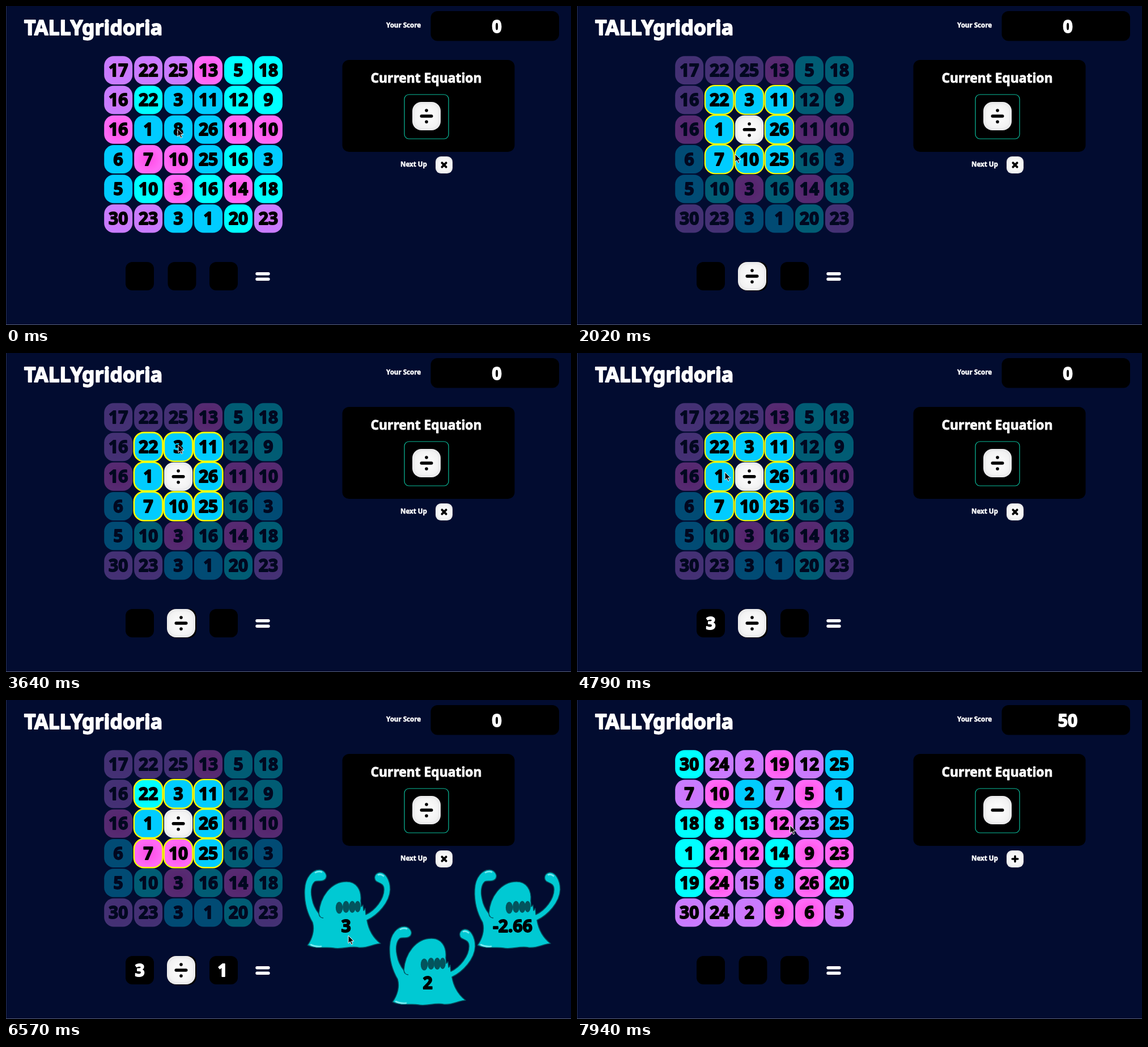
Write an HTML page that moves like this. It is 997 px wide and 562 px high and loops after 8 s.

```html
<!DOCTYPE html>
<html lang="en">
<head>
<meta charset="utf-8">
<title>TALLYgridoria</title>
<style>
html, body { margin: 0; width: 100%; height: 100%; overflow: hidden; background: #020c30; }
svg { display: block; width: 997px; height: 562px; }
text { font: 700 30px "Noto Sans", "Open Sans", sans-serif; text-anchor: middle; stroke-width: 1.8; stroke-linejoin: round; }
.dark { fill: #000; stroke: #000; }
.light { fill: #fff; stroke: #fff; }
.left { text-anchor: start; }
.small { font-size: 11.6px; stroke-width: .5; }
.op { stroke: #000; stroke-width: 5.6; stroke-linecap: round; fill: none; }
.ring { fill: none; stroke: #fdff00; }
</style>
</head>
<body>
<svg viewBox="0 0 997 562" xmlns="http://www.w3.org/2000/svg">
  <defs>
    <radialGradient id="k"><stop offset=".15" stop-color="#ff50e6"/><stop offset=".9" stop-color="#ff69f6"/></radialGradient>
    <radialGradient id="p"><stop offset=".15" stop-color="#d073fb"/><stop offset=".9" stop-color="#c97cff"/></radialGradient>
    <radialGradient id="w"><stop offset=".4" stop-color="#fbfbfb"/><stop offset="1" stop-color="#f3f3f3"/></radialGradient>
    <g id="face">
      <rect x="-25" y="-25" width="50" height="50" rx="16" fill="#ebebec"/>
      <rect x="-21" y="-21" width="42" height="42" rx="14" fill="url(#w)"/>
    </g>
    <g id="divide"><use href="#face"/><path class="op" d="M-8.7 0H8.7M0-10v.01M0 10v.01"/></g>
    <g id="minus"><use href="#face"/><path class="op" d="M-8.7 0H8.7"/></g>
    <g id="times"><use href="#face"/><path class="op" style="stroke-width:6.5" d="M-6-6L6 6M6-6L-6 6"/></g>
    <g id="plus"><use href="#face"/><path class="op" style="stroke-width:6" d="M-8 0H8M0-8V8"/></g>
    <g id="monster">
      <path fill="#00c9d3" stroke="#064a58" stroke-width="1.5" stroke-linejoin="round" d="M532 432C540 421 545 406 541 392C531 375 526 354 527 334C528 312 541 298 554 299C563 300 568 309 564 315C559 322 550 317 545 320C539 325 537 337 540 350C542 361 547 370 552 376C554 347 573 320 601 320C618 320 628 334 626 354L627 364L630 361L631 371L634 367L635 378C651 371 667 351 667 334C667 324 660 323 654 320C648 315 650 306 658 304C670 302 678 318 678 334C677 357 656 379 637 388C640 405 648 419 661 429C647 430 637 438 622 436C606 433 592 440 578 437C564 434 548 440 532 432Z"/>
      <path fill="none" stroke="#064a58" stroke-width="1.5" d="M552 376Q553 384 560 384"/>
      <g fill="#03545d">
        <ellipse cx="588" cy="366" rx="6.2" ry="10.5"/><ellipse cx="600" cy="364.5" rx="6" ry="10.5"/>
        <ellipse cx="611" cy="364.5" rx="5.8" ry="10.5"/><ellipse cx="620.5" cy="364" rx="5.3" ry="10"/>
      </g>
      <path fill="none" stroke="#7beaf0" stroke-width="2.6" stroke-linecap="round" d="M538 431Q545 435 556 434M546 304Q551 301 557 303M657 308Q661 306 666 310"/>
    </g>
  </defs>

  <rect width="997" height="562" fill="#020c30"/>
  <path fill="#283152" d="M0 0h1v562H0z"/>
  <path fill="#596079" d="M0 561h997v1H0z"/>

  <text class="light left" x="32" y="50.5" style="font-size:35.5px">TALLYgridoria</text>
  <text class="light left small" x="671" y="38">Your Score</text>
  <rect x="749.5" y="9" width="226.5" height="52.5" rx="12"/>
  <text id="score" class="light" x="866" y="46.5"></text>

  <rect x="593.5" y="95" width="304" height="162" rx="12"/>
  <text class="light" x="741.5" y="134.7" style="font-size:22.8px;stroke-width:.9">Current Equation</text>
  <rect x="703" y="156" width="78" height="78" rx="8" fill="none" stroke="#0bbd9c" stroke-width="1.2"/>
  <use id="current" x="742" y="194"/>
  <text class="light left small" x="696" y="283">Next Up</text>
  <use id="next" transform="translate(773 280) scale(.6)"/>

  <g id="slots"></g>
  <text id="first" class="light" x="236" y="486.5">3</text>
  <text id="second" class="light" x="382" y="486.5">1</text>
  <g id="chosen"><rect x="287" y="453" width="49" height="49" rx="14"/><use href="#divide" x="309" y="476"/></g>
  <path stroke="#fff" stroke-width="5.4" stroke-linecap="round" d="M443 471.7h20M443 481.2h20"/>

  <g id="before"></g>
  <g id="after"></g>

  <g id="answers">
    <use href="#monster"/><use href="#monster" x="300"/><use href="#monster" x="150" y="100"/>
    <text class="dark" x="600" y="409">3</text>
    <text class="dark" x="894" y="409">-2.66</text>
    <text class="dark" x="744" y="509">2</text>
  </g>
  <path id="cursor" fill="#000" stroke="#fff" stroke-width="1" stroke-linejoin="round" d="M0 0V13.5L3.2 10.7L5.5 15.8L7.8 14.8L5.5 9.9H9.8Z"/>
</svg>

<script>
const LOOP = 8000, PICK = 390, FIRST = 4080, SECOND = 5150, SOLVED = 6900, PULSE = 1500;
const $ = id => document.getElementById(id);
const fills = { p: 'url(#p)', k: 'url(#k)', c: '#00ffff', b: '#00ccff' };

function add(parent, tag, attrs, text) {
  const el = document.createElementNS('http://www.w3.org/2000/svg', tag);
  for (const key in attrs) el.setAttribute(key, attrs[key]);
  if (text) el.textContent = text;
  return parent.appendChild(el);
}

function makeGrid(parent, cells) {
  return cells.split(' ').map((cell, i) => {
    const col = i % 6, row = Math.floor(i / 6);
    const g = add(parent, 'g', { transform: `translate(${198.2 + col * 52.95} ${113.2 + row * 52.25})` });
    const fill = fills[cell.slice(-1)];
    const rect = add(g, 'rect', { x: -25, y: -25, width: 50, height: 50, rx: 17, fill });
    add(g, 'text', { class: 'dark', y: 10.7 }, cell.slice(0, -1));
    const reach = Math.max(Math.abs(col - 2), Math.abs(row - 2));
    return { g, rect, fill, reach };
  });
}

const board = makeGrid($('before'),
  '17p 22p 25p 13k 5c 18c 16p 22c 3b 11b 12c 9c 16k 1b 8b 26b 11k 10k ' +
  '6b 7k 10k 25b 16c 3b 5b 10c 3k 16c 14k 18c 30p 23p 3b 1b 20c 23p');
makeGrid($('after'),
  '30c 24p 2p 19k 12p 25b 7p 10k 2b 7p 5k 1b 18c 8c 13c 12k 23p 25b ' +
  '1c 21k 12k 14c 9k 23k 19c 24k 15p 8b 26k 20c 30p 24p 2p 9k 6k 5p');

const near = board.filter(c => c.reach === 1);
const far = board.filter(c => c.reach > 1);
const rings = near.map(c => add(c.g, 'rect', { class: 'ring', x: -25.3, y: -25.3, width: 50.6, height: 50.6, rx: 17.5 }));
const center = add(board.find(c => c.reach === 0).g, 'use', { href: '#divide' });
for (const x of [211, 285.5, 359]) add($('slots'), 'rect', { x, y: 451, width: 50, height: 50, rx: 12 });

// time, x, y
const path = [
  [0, 303, 216.5], [1350, 303, 216.5], [2020, 279, 261], [2500, 268, 262], [2950, 292, 232],
  [3600, 304, 162], [4250, 304, 162], [4790, 261, 210], [5000, 253, 215], [5250, 253, 215],
  [6050, 745, 467], [6480, 604, 415], [7190, 604, 415], [7490, 454, 255], [7690, 454, 255],
  [7940, 376, 221], [LOOP, 376, 221]
];

function cursorAt(t) {
  const i = path.findIndex(p => p[0] > t);
  const [t0, x0, y0] = path[i - 1], [t1, x1, y1] = path[i];
  const u = (t - t0) / (t1 - t0), e = u * u * (3 - 2 * u);
  return [x0 + (x1 - x0) * e, y0 + (y1 - y0) * e];
}

const show = (el, on) => el.setAttribute('visibility', on ? 'visible' : 'hidden');

function draw(t) {
  const solved = t >= SOLVED, active = t >= PICK && !solved, ready = t >= SECOND && !solved;
  $('before').style.display = solved ? 'none' : '';
  $('after').style.display = solved ? '' : 'none';
  show($('chosen'), active);
  show($('first'), t >= FIRST && !solved);
  show($('second'), ready);
  show($('answers'), ready);
  show(center, active);
  $('score').textContent = solved ? '50' : '0';
  $('current').setAttribute('href', solved ? '#minus' : '#divide');
  $('next').setAttribute('href', solved ? '#plus' : '#times');

  const phase = ((t - PICK + PULSE) % PULSE) / PULSE;
  const swell = Math.min(1, 2 * (1 - Math.abs(2 * phase - 1)));
  for (const ring of rings) {
    show(ring, active);
    ring.setAttribute('stroke-width', 1.6 + 1.6 * swell);
  }
  for (const c of near) c.rect.setAttribute('fill', active && !ready ? fills.b : c.fill);
  for (const c of far) c.g.setAttribute('opacity', active ? .33 : 1);
  $('cursor').setAttribute('transform', `translate(${cursorAt(t)})`);
}

let start;
function tick(now) {
  start ??= now;
  draw((now - start) % LOOP);
  requestAnimationFrame(tick);
}
draw(0);
requestAnimationFrame(tick);
</script>
</body>
</html>
```
